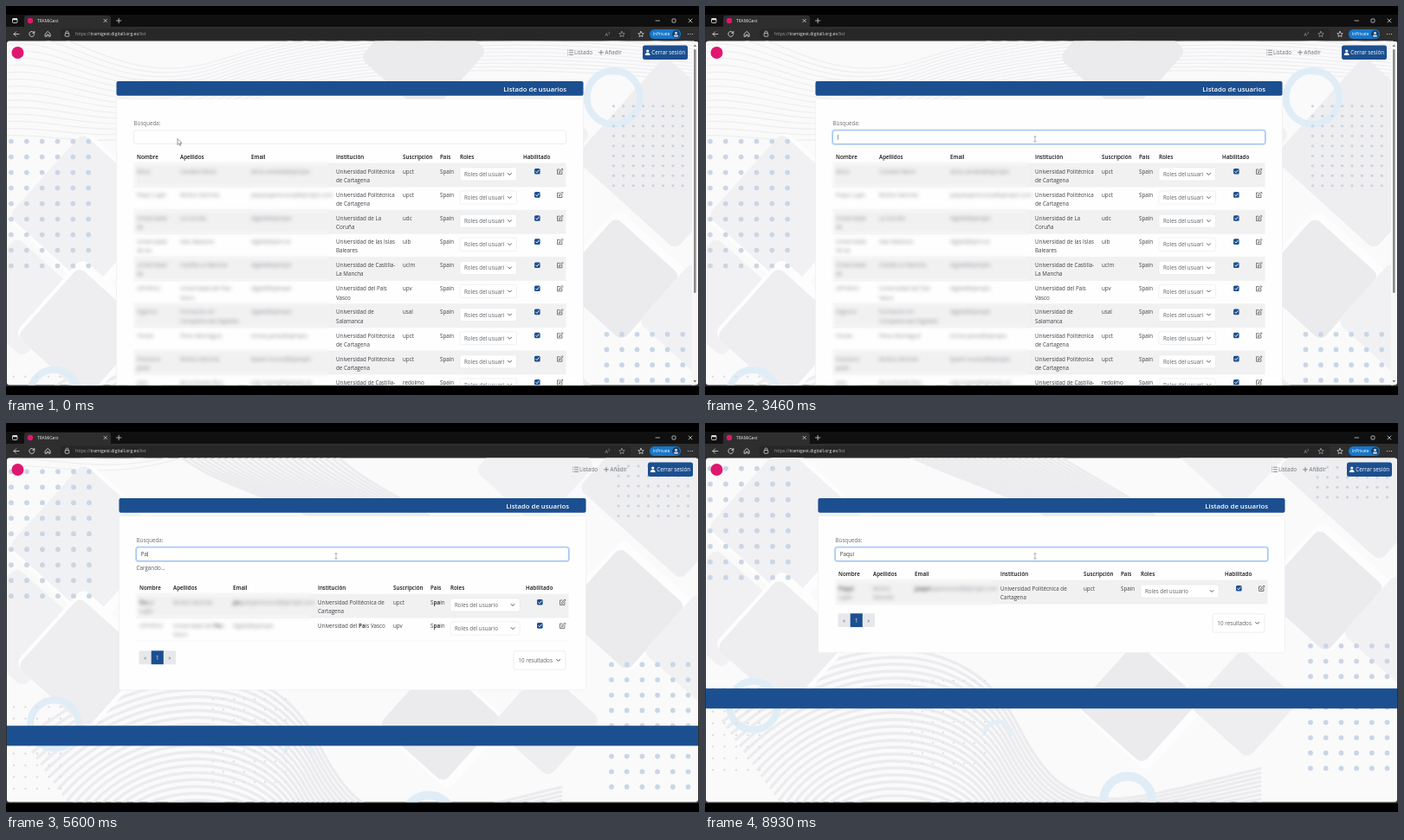
Write an HTML page that moves like this. It is 800 px wide and 450 px high and loops after 9 s.

```html
<!DOCTYPE html>
<html lang="es">
<head>
<meta charset="utf-8">
<title>Listado de usuarios</title>
<style>
html, body { margin: 0; width: 100%; height: 100%; overflow: hidden; background: #000; }
svg { display: block; width: 800px; height: 450px; font: 6.25px "Open Sans", "Noto Sans", sans-serif; }
.blur { filter: blur(1.9px); }
.blur tspan { fill: #666; }
.line { fill: none; stroke-linecap: round; stroke-linejoin: round; }
text { white-space: pre; }
tspan.hit { font-weight: 700; }
</style>
</head>
<body>
<svg viewBox="0 0 800 450">
  <defs>
    <clipPath id="view"><rect x="1" y="40.6" width="798" height="397.8" rx="3"/></clipPath>
    <g id="backdrop"></g>
  </defs>
  <rect width="800" height="450"/>
  <g id="chrome"></g>
  <g clip-path="url(#view)">
    <g id="page"></g>
    <rect id="caret" width=".5" height="6" fill="#333"/>
    <path id="arrow" d="M0 0V7L1.7 5.5 2.8 8 4 7.5 2.9 5.1H5Z" fill="#fff" stroke="#555" stroke-width=".6"/>
    <path id="beam" class="line" d="M-1.2-3H1.2M0-3V3M-1.2 3H1.2" stroke="#777" stroke-width=".55"/>
  </g>
</svg>
<script>
const LOOP = 9000, FOCUS = 3300, BLINK = 530, ROW = 27.1;
const BLUE = "#1c4f8f", GREY = "#6c7075", PINK = "#e0176f";
const $ = id => document.getElementById(id);
const range = n => [...Array(n).keys()];
const clamp = v => Math.max(0, Math.min(1, v));

// Drawing helpers
const rect = (x, y, w, h, fill, more = "") =>
  `<rect x="${x}" y="${y}" width="${w}" height="${h}" fill="${fill}" ${more}/>`;
const text = (x, y, str, fill = "#3f4246", more = "") =>
  `<text x="${x}" y="${y}" fill="${fill}" ${more}>${str}</text>`;
const line = (d, stroke, width = 0.8, more = "") =>
  `<path class="line" d="${d}" stroke="${stroke}" stroke-width="${width}" ${more}/>`;
const circle = (x, y, r, fill, more = "") =>
  `<circle cx="${x}" cy="${y}" r="${r}" fill="${fill}" ${more}/>`;
const chevron = (x, y) => line(`M${x - 2} ${y - 1}l2 2 2-2`, "#444", 0.9);
const bold = 'font-weight="600"';

// Backdrop
const dots = (x, y, cols, rows, step, r, fill) => range(cols * rows).map(i =>
  circle(x + i % cols * step, y + Math.floor(i / cols) * step, r, fill)).join("");
const ring = (x, y, r, w) => circle(x, y, r, "none", `stroke="#e0edf6" stroke-width="${w}"`);
const tile = (x, y, r, fill = "#ebebee") => {
  const s = r * 1.5;
  return rect(-s / 2, -s / 2, s, s, fill, `rx="9" transform="translate(${x} ${y}) rotate(42)"`);
};

function drawBackdrop() {
  const band = range(24).map(k => line(
    `M${170 + 8 * k} -10C${230 + 8 * k} 60 ${330 + 6 * k} 60 ${430 + 5 * k} 130`, "#ececef", 3));
  const hump = range(22).map(k => line(
    `M${20 + 5 * k} ${345 + 7 * k}C150 ${240 + 8 * k} ${300 - k} ${230 + 9 * k} ${360 - 2 * k} ${350 + 6 * k}` +
    `S470 ${440 + 4 * k} 640 ${400 + 5 * k}`, "#ececef", 3.4));
  const ripples = range(16).map(k => line(
    `M-5 ${-92 + 8 * k}C70 ${-110 + 9 * k} 130 ${-20 + 5 * k} 250 ${-60 + 4 * k}S600 ${-130 + 5 * k} 805 ${-95 + 4 * k}`, "#eeeef1", 1.2));
  return rect(0, -140, 800, 640, "#fafafb") + ripples.join("") + band.join("") + hump.join("") +
    tile(485, -66, 70) + tile(772, 48, 106, "#eeeef0") + tile(610, 30, 66, "#f1f1f3") +
    tile(98, 120, 92, "#fdfdfe") + tile(93, 116, 86, "#f1f1f3") + tile(15, 215, 66, "#f1f1f3") +
    tile(92, 252, 78, "#fdfdfe") + tile(88, 256, 72, "#eeeef0") +
    tile(715, 190, 74, "#fdfdfe") + tile(712, 194, 68) + tile(800, 240, 62, "#f1f1f3") +
    tile(505, 328, 72, "#fdfdfe") + tile(500, 324, 67) + tile(622, 325, 60, "#eeeef0") +
    ring(706, -16, 31, 8) + ring(55, 327, 28, 8) + ring(487, 437, 28, 10) +
    line("M321 362a16 16 0 0 1 32 0", "#e4eff7", 5, 'style="stroke-linecap:butt"') +
    dots(5, 34.8, 6, 9, 18, 2.9, "#cad6e5") + dots(698, 258, 6, 9, 17.7, 2.9, "#cad6e5") +
    dots(706, -6, 8, 9, 11.5, 1.6, "#cad2df") + dots(238, 298, 8, 9, 12, 1.2, "#e0e2e7") +
    dots(8, 307, 5, 8, 13.5, 1.2, "#e0dbe1");
}

function drawChrome() {
  const w = "#e8e8e8", g = "#a3a3a3";
  return rect(0, 10, 800, 430, "#101010") + rect(0, 24, 800, 416, "#2e2e2e") +
    rect(21, 11, 100, 15, "#2e2e2e", 'rx="3"') + rect(63, 26.5, 658, 12.5, "#272727", 'rx="3"') +
    rect(7.5, 14.5, 5.5, 5, "none", `stroke="${w}" stroke-width=".8" rx="1"`) + rect(7.5, 14.5, 5.5, 1.7, w) +
    circle(28, 17, 3.2, PINK) + text(36, 18.9, "TRAMiGest", w, 'font-size="4.8"') +
    line("M113 15.3l3.4 3.4m0-3.4l-3.4 3.4M127.5 17h5.4m-2.7-2.7v5.4", w, 0.7) +
    line("M750 17h4.5M788 15l4 4m0-4l-4 4", w, 0.7) +
    rect(769, 15, 4, 4, "none", `stroke="${w}" stroke-width=".7" rx=".8"`) +
    line("M15 32.5H9m2.6-2.6L9 32.5l2.6 2.6M32.5 31a3 3 0 1 0 .3 2M32.8 29.4v2h-2", w, 0.8) +
    line("M45.5 32l2.8-2.6 2.8 2.6v3.2h-1.8v-2h-2v2h-1.8z", w, 0.8) +
    line("M69 31.5v-1a1.5 1.5 0 0 1 3 0v1", w, 0.7) +
    rect(68.2, 31.6, 4.6, 3.6, "none", `stroke="${w}" stroke-width=".7" rx=".6"`) +
    text(80, 34.3, `<tspan fill="${g}">https://</tspan>tramigest.digitall.org.es<tspan fill="${g}">/list</tspan>`, w, 'font-size="5.1"') +
    text(691.5, 34.5, "A", g, 'font-size="5.5"') + line("M696 30q1.5 1 0 2.5", g, 0.6) +
    [711, 733].map(x => line(`M${x} 29.4l1 2.1 2.2.3-1.6 1.5.4 2.2-2-1.1-2 1.1.4-2.2-1.6-1.5 2.2-.3z`, x < 720 ? g : w, 0.7)).join("") +
    rect(743, 27, 36, 11, "#1877c9", 'rx="5.5"') + text(747, 34.3, "InPrivate", "#fff", 'font-size="4.7"') +
    circle(773.5, 32.5, 4.4, "#173f6b") + circle(773.5, 31.2, 1.5, "#cfd8e2") +
    rect(771, 33.4, 5, 2.3, "#cfd8e2", 'rx="1.2"') +
    [787.5, 790, 792.5].map(x => circle(x, 32.5, 0.6, w)).join("");
}

// Rows: name, surname, email, institution, subscription ("|" breaks a line)
const upct = "Universidad Politécnica|de Cartagena";
const people = [
  ["Alicia", "Candela Marín", "alicia.candela@ejemplo", upct, "upct"],
  ["Paqui Luján", "Muñoz Sánchez", "paquilujanmunoz@ejemplo.com", upct, "upct"],
  ["Universidad|de", "La Coruña", "digital@ejemplo", "Universidad de La|Coruña", "udc"],
  ["Universidad|de las", "Islas Baleares", "digital@ejem.es", "Universidad de las Islas|Baleares", "uib"],
  ["Universidad|de", "Castilla-La Mancha", "digital@ejemplo", "Universidad de Castilla-|La Mancha", "uclm"],
  ["UPV/EHU", "Universidad del País|Vasco", "digital@ejemplo", "Universidad del País|Vasco", "upv"],
  ["Digicom", "Formación en|Competencias Digitales", "digital@ejemplo", "Universidad de|Salamanca", "usal"],
  ["Tomás", "Pérez Montagud", "tomas.perez@ejemplo", upct, "upct"],
  ["Francisco|Javier", "Muñoz Sánchez", "fjavier.munoz@ejemplo", upct, "upct"],
  ["Julio", "de la Fuente Rico", "julio.fuente@ejemplo.es", "Universidad de Castilla-|La Mancha", "redolmo"]
];
const upctWide = "Universidad Politécnica de|Cartagena";
const match = ["Paqui|Luján", "Muñoz|Sánchez", people[1][2], upctWide, "upct"];
const pair = [
  ["Paqui|Luján", "Muñoz Sánchez", people[1][2], upctWide, "upct"],
  [...people[5].slice(0, 3), "Universidad del País Vasco", "upv"]
];

const heads = ["Nombre", "Apellidos", "Email", "Institución", "Suscripción", "País", "Roles", "Habilitado"];
const tall = { rows: people, cols: [151, 201, 283, 381, 458, 501, 524, 597], tall: true };
const two = { rows: pair, cols: [154, 193, 262, 360, 447, 490, 513, 600] };
const one = { rows: [match], cols: [154, 194, 242, 340, 436, 479, 502, 600] };
const last = { rows: [match], cols: [154, 194, 242, 341, 437, 480, 503, 600] };

const scenes = [
  { at: 0, query: "", list: tall },
  { at: 4130, query: "P", list: tall, loading: true },
  { at: 4870, query: "P", list: tall },
  { at: 5270, query: "Pa", list: two, loading: true },
  { at: 6070, query: "Pa", list: one },
  { at: 6800, query: "Paq", list: last, loading: true },
  { at: 6930, query: "Paqu", list: last, loading: true },
  { at: 7130, query: "Paqui", list: last, loading: true },
  { at: 7430, query: "Paqui", list: last }
];

const mark = (str, query) => query
  ? str.replace(new RegExp(query, "gi"), hit => `<tspan class="hit">${hit}</tspan>`) : str;
const cell = (x, y, str, query, fill) =>
  str.split("|").map((s, i) => text(x, y + i * 10.2, mark(s, query), fill)).join("");

function drawRow(row, i, top, left, { cols, tall }, query) {
  const y = top + i * ROW, base = y + 11.8, split = cols[3] - 8;
  const right = left + 499, stripe = i % 2 ? "none" : "#f1f1f2";
  const box = cols[7] + 13, edit = cols[7] + 42.5, end = tall ? 589.5 : 593;
  return rect(split - 2, y, right - split + 2, ROW, stripe) +
    `<g class="blur">${rect(left + 1, y, split - left, ROW, stripe)}` +
    row.slice(0, 3).map((s, c) => cell(cols[c], base, s, query, "#8b8d91")).join("") + "</g>" +
    cell(cols[3], base, row[3], query) + cell(cols[4], base, row[4], query) + cell(cols[5], base, "Spain", query) +
    line(`M${left} ${y + ROW}H${right}`, "#e6e7e9", 0.4) +
    rect(cols[6], y + 5, end - cols[6], 15, "#fff", 'rx="2" stroke="#dee2e6" stroke-width=".5"') +
    text(cols[6] + 5, y + 15, tall ? "Roles del usuari" : "Roles del usuario", "#5d6166") + chevron(end - 8, y + 12.5) +
    rect(box, y + 6, 6.6, 6.6, BLUE, 'rx="1.5"') + line(`M${box + 1.6} ${y + 9.5}l1.3 1.3 2.3-2.8`, "#fff", 0.9) +
    line(`M${edit - 0.5} ${y + 7}h-2.5v5.4h5.4v-2.6M${edit - 1} ${y + 10.6}l.3-1.4 3.2-3.2 1.1 1.1-3.2 3.2z`, "#444", 0.7);
}

function drawPage({ query, list, loading }) {
  const left = list.tall ? 147.5 : 150.5, card = left - 20, nav = list.tall ? 0 : 6;
  const top = loading ? 198 : 182, end = top + list.rows.length * ROW + 0.6;
  const scale = list.tall ? 0.992 : 1;
  const pager = ["«", "1", "»"].map((s, i) =>
    rect(left + 3 + i * 14.2, end + 10.6, 14.2, 15.8, i == 1 ? BLUE : "#e6e8eb", i == 1 ? "" : 'rx="1.5"') +
    text(left + 10 + i * 14.2, end + 20.8, s, i == 1 ? "#fff" : "#777", 'text-anchor="middle"')).join("");
  return `<use href="#backdrop" transform="translate(1 ${(end - 210) / 2}) scale(${scale} 1)"/>` +
    circle(13.5, 54, 7, PINK) +
    [51.2, 53.8, 56.4].map(y => line(`M${648.5 + nav} ${y}h.3m1.7 0h4`, GREY)).join("") +
    text(656 + nav, 56.2, "Listado", GREY) + line(`M${684.5 + nav} 53.8h5m-2.5-2.5v5`, GREY) +
    text(691.5 + nav, 56.2, "Añadir", GREY) +
    rect(735 + nav, 45.5, 52, 16.5, BLUE, 'rx="2.5"') + circle(740.7 + nav, 52, 1.6, "#fff") +
    `<path d="M${737.8 + nav} 57q0-3 2.9-3t2.9 3z" fill="#fff"/>` + text(745.3 + nav, 56.2, "Cerrar sesión", "#fff") +
    rect(card, 87, 539, 16.7, BLUE, 'rx="2"') +
    text(left + 499.5, 98.8, "Listado de usuarios", "#fff", `${bold} font-size="7.75" text-anchor="end"`) +
    rect(card, 107.5, 539, end + 56 - 107.5, "#fefefe", 'rx="2" stroke="#e8e8ea" stroke-width=".5"') +
    text(left, 138.2, "Búsqueda:", GREY) +
    rect(left, 144, 499, 15.5, "#fff", 'rx="2.5" stroke="#dee2e6" stroke-width=".6"') +
    `<g id="focus">${rect(left, 144, 499, 15.5, "none", 'rx="2.5" stroke="#c5dcfb" stroke-width="3"')}` +
    `${rect(left, 144, 499, 15.5, "#fff", 'rx="2.5" stroke="#86b2ef" stroke-width=".7"')}</g>` +
    text(left + 5.3, 154.2, query, "#444", 'id="query"') +
    (loading ? text(left, 170.3, "Cargando...", "#5a5d61") : "") +
    heads.map((s, i) => text(list.cols[i], top - 4.8, s, "#151515", bold)).join("") +
    line(`M${left} ${top}h499`, "#e6e7e9", 0.4) +
    list.rows.map((row, i) => drawRow(row, i, top, left, list, query)).join("") +
    pager + rect(left + 435.5, end + 11, 60, 21.5, "#fff", 'rx="2.5" stroke="#dee2e6" stroke-width=".6"') +
    text(left + 441, end + 24, "10 resultados", "#5d6166") + chevron(left + 487, end + 21.7) +
    rect(0, end + 97.4, 800, 23.2, BLUE) +
    (list.tall ? rect(792, 41, 7, 398, "#f7f7f8") + rect(794, 50, 2.6, 282, "#8b8b8b", 'rx="1.3"') +
      '<path d="M793.5 47l1.8-2.4 1.8 2.4zM793.5 433l1.8 2.4 1.8-2.4z" fill="#777"/>' : "");
}

// Pointer stops: time, x, y
const stops = [[0, 198, 153.5], [900, 198, 153.5], [2050, 411, 159], [2450, 411, 159], [2950, 381, 154]];
function pointerAt(t) {
  const i = stops.findIndex(s => s[0] > t);
  if (i < 0) return stops.at(-1).slice(1);
  const a = stops[i - 1], b = stops[i], u = (t - a[0]) / (b[0] - a[0]), e = u * u * (3 - 2 * u);
  return [a[1] + (b[1] - a[1]) * e, a[2] + (b[2] - a[2]) * e];
}

let shown;
function update(now) {
  const t = now % LOOP;
  const scene = scenes.findLast(s => s.at <= t);
  if (scene !== shown) {
    $("page").innerHTML = drawPage(scene);
    const q = $("query");
    $("caret").setAttribute("x", +q.getAttribute("x") + (scene.query ? q.getComputedTextLength() : 0) + 0.2);
    $("caret").setAttribute("y", 148.8);
    shown = scene;
  }
  $("focus").setAttribute("opacity", clamp((t - FOCUS) / 150));
  const typed = scenes.find(s => s.query === scene.query).at || FOCUS;
  const lit = t >= FOCUS && Math.floor((t - typed) / BLINK) % 2 === 0;
  $("caret").setAttribute("opacity", +lit);
  const [x, y] = pointerAt(t), overInput = t > 2750;
  for (const [id, on] of [["arrow", !overInput], ["beam", overInput]]) {
    $(id).setAttribute("transform", `translate(${x} ${y})`);
    $(id).setAttribute("opacity", +on);
  }
}

$("backdrop").innerHTML = drawBackdrop();
$("chrome").innerHTML = drawChrome();
const start = performance.now();
function tick() {
  update(performance.now() - start);
  requestAnimationFrame(tick);
}
tick();
</script>
</body>
</html>
```
